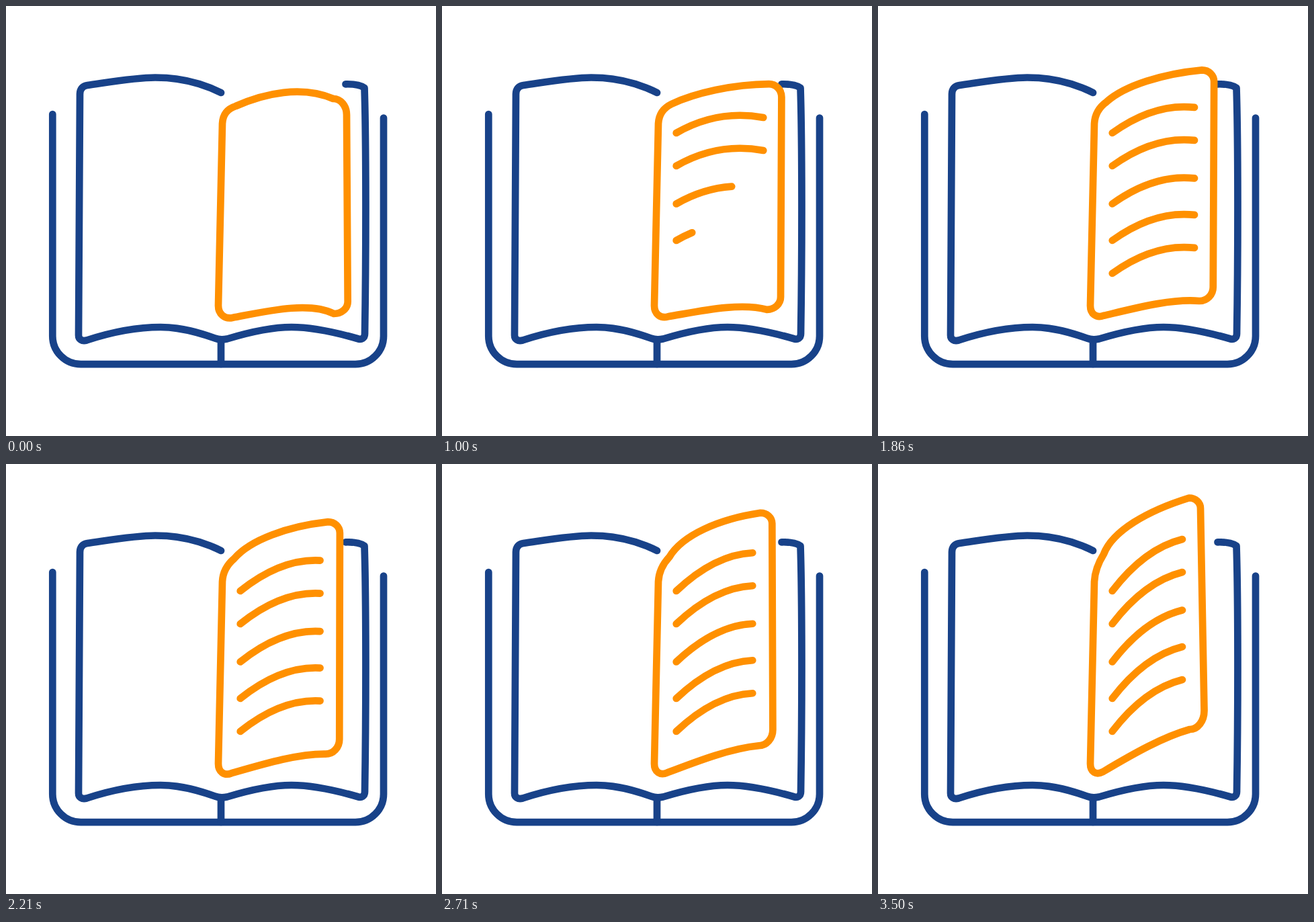
Recreate the animation shown at these times as an HTML page. Size 640x640 px, loop 3.57 s.

```html
<!DOCTYPE html>
<html lang="en">
<head>
<meta charset="utf-8">
<title>Open book</title>
<style>
  html, body { margin: 0; width: 100%; height: 100%; overflow: hidden; background: #fff; }
  svg { display: block; width: 100%; height: 100%; }
  path { fill: none; stroke-width: 10.7; stroke-linecap: round; stroke-linejoin: round; }
  #book path { stroke: #184289; }
  #leaf path { stroke: #ff9000; }
</style>
</head>
<body>
<svg viewBox="0 0 640 640">
  <g id="book">
    <path d="M69.3 161V491A42 42 0 0 0 111.3 533.2H520A42 42 0 0 0 562 491V166.500"/>
    <path d="M320 497V533"/>
    <path d="M320 129C288 113 255 106.500 222 106.500C192 106.500 150 114 121 118
      C114 119 110 124 110 131L108 490C108 496 113 499.500 120 497.500
      C155 486 195 478 230 478C262 478 290 487 311 494.500C316 496.500 324 496.500 329 495.500
      C362 485.500 395 478 425 478C455 478 495 487 523 495C529 497.500 534 494 534 488
      C536 370 536 200 533.500 122C528 117.500 518 116 505.500 116.300"/>
  </g>
  <g id="leaf"><path id="edge"/></g>
</svg>
<script>
const LOOP = 3570, FPS = 14, LAST = 49;
const LINE_X = 348.7, LINE_Y = [189, 238, 294.5, 349, 398];
const STAGGER = 4.08, DRAW = 9;

const leaf = document.getElementById('leaf');
const edge = document.getElementById('edge');
const lines = LINE_Y.map(() => {
  const p = document.createElementNS('http://www.w3.org/2000/svg', 'path');
  p.setAttribute('pathLength', 1);
  return leaf.appendChild(p);
});

// Smooth path through evenly timed stops, u from 0 to 1
function along(u, ...stops) {
  const s = u * (stops.length - 1);
  const weight = i => stops.reduce((w, _, j) => j === i ? w : w * (s - j) / (i - j), 1);
  return [0, 1].map(axis => stops.reduce((sum, p, i) => sum + p[axis] * weight(i), 0));
}

const toward = (a, b) => a.map((v, i) => v + (b[i] - v) * 0.56);
const corner = (a, q, b) => `C${toward(a, q)} ${toward(b, q)} ${b}`;

function outline(u) {
  const topLeft = along(u, [342, 149], [340.5, 143], [336, 134]);
  const topOut = along(u, [385, 130], [374, 128], [362, 111], [349, 100]);
  const topIn = along(u, [440, 118], [432, 114], [418, 90], [400, 70]);
  const topRight = along(u, [487, 138], [483, 98], [463, 50.5]);
  const rightTop = along(u, [507, 162], [501, 115.5], [480, 66]);
  const rightEnd = along(u, [508.7, 440], [499.5, 420.5], [485.5, 367]);
  const baseRight = along(u, [488, 458], [479, 441], [464, 395]);
  const baseOut = along(u, [450, 439], [438, 436.5], [425, 406]);
  const baseIn = along(u, [385, 455], [385, 450], [382, 430]);
  const baseLeft = along(u, [337, 464], [335, 458]);
  return `M322 175Q323 155 ${topLeft}C${topOut} ${topIn} ${topRight}` +
    corner(topRight, [rightTop[0], topRight[1]], rightTop) + `L${rightEnd}` +
    corner(rightEnd, [rightEnd[0], baseRight[1]], baseRight) +
    `C${baseOut} ${baseIn} ${baseLeft}` + corner(baseLeft, [316, 468], [316, 446]) + 'Z';
}

function draw(ms) {
  const f = Math.min(LAST, Math.floor((ms % LOOP + 5) * FPS / 1000));
  const u = f / LAST;
  edge.setAttribute('d', outline(u));
  // Bend and end of every text line, y relative to its start
  const [cx, cy] = along(u, [403, -25], [411, -43.5], [397, -63]);
  const [ex, ey] = along(u, [485, -10], [472, -36], [453, -77]);
  lines.forEach((p, i) => {
    const y = LINE_Y[i];
    const part = Math.max(0, Math.min(1, (f - i * STAGGER) / DRAW));
    p.setAttribute('d', `M${LINE_X} ${y}Q${cx} ${y + cy} ${ex} ${y + ey}`);
    p.setAttribute('stroke-dasharray', `${part} 2`);
    p.setAttribute('visibility', part ? 'visible' : 'hidden');
  });
}

const start = performance.now();
function tick() {
  draw(performance.now() - start);
  requestAnimationFrame(tick);
}
tick();
</script>
</body>
</html>
```
